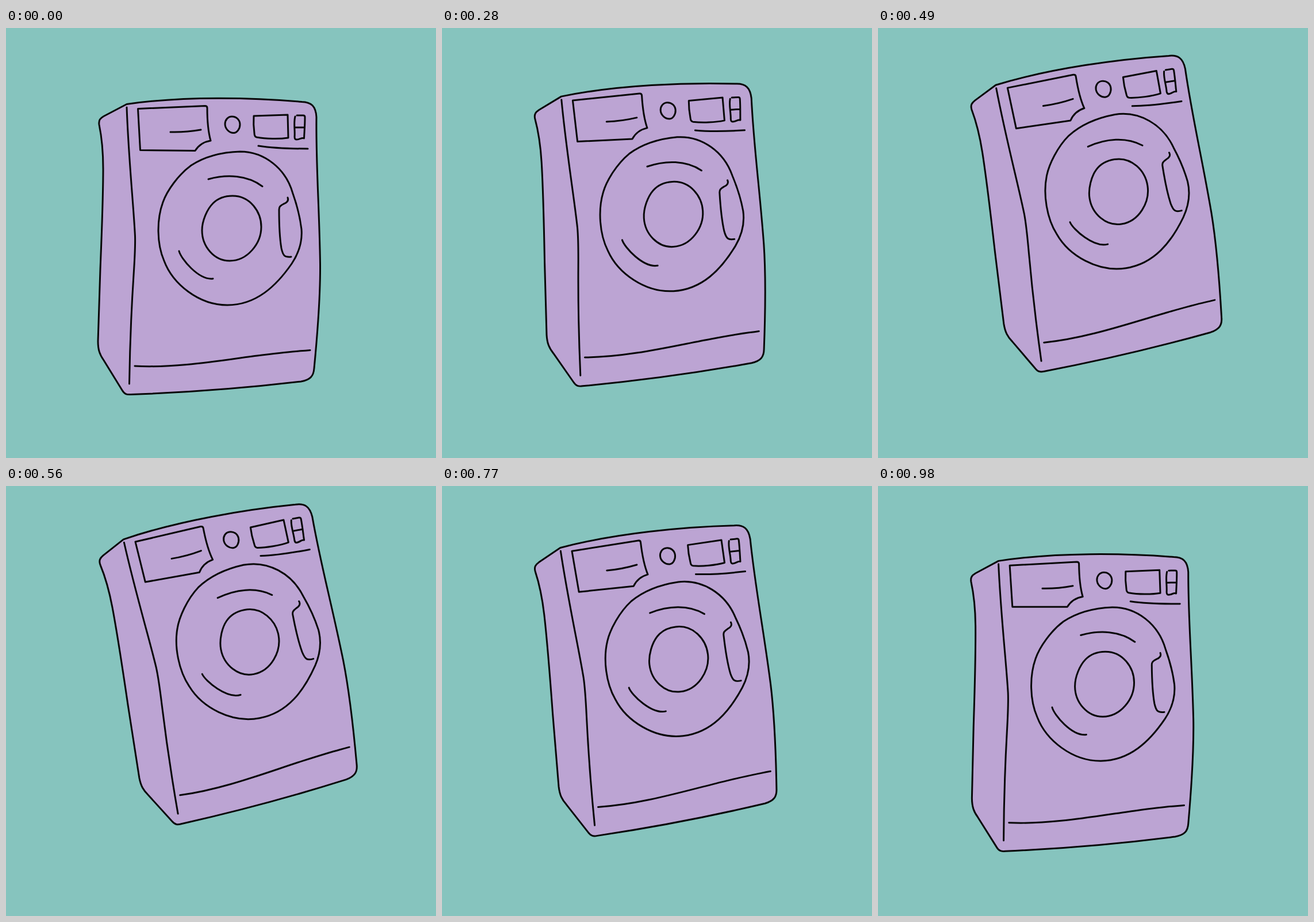
Write an HTML page that moves like this. It is 748 px wide and 748 px high and loops after 1.05 s.

```html
<!DOCTYPE html>
<html lang="en">
<head>
<meta charset="utf-8">
<title>Washing machine</title>
<style>
  html, body { margin: 0; width: 100%; height: 100%; overflow: hidden; background: #86c4be; }
  svg { display: block; width: 100%; height: 100%; }
  #washer { fill: none; stroke: #080808; stroke-width: 3; stroke-linecap: round; stroke-linejoin: round; }
  #washer .body { fill: #bca4d3; }
</style>
</head>
<body>
<svg viewBox="0 0 748 748">
  <g id="washer">
    <!-- cabinet -->
    <path class="body" d="M210 132.500L170 153.500C164 157 161 160 162 168C167 192 169 215 169 245C169 300 166 370 164 420L160 545C160 560 163 568 170 578L202 630C206 637 210 638 217 637.500C320 634 420 626 513 615C529 612 535 606 536 592C542 530 547 470 546.500 410C545 310 539 240 540 155C539 136 531 129 515 128.500C430 121 310 118 210 132.500Z"/>
    <path d="M210 138C213 225 222 310 224.500 362C226 410 217 450 214.500 619"/>
    <path d="M224 588C300 592 380 577 445 569S500 563 529 560.500"/>
    <!-- control panel -->
    <path d="M229.500 140.500L346 135.500Q350 135.500 350 139C350 158 351 178 356 196C343 198 335 204 329 213.500L233.500 212.500Z"/>
    <path d="M286 181C303 181.500 322 180 339 177"/>
    <path d="M393 154C401 154 407 160 407 168C407 175 402 182.500 396 182.500C388 182.500 381 175 381 167C381 160 386 154 393 154Z"/>
    <path d="M431 153L490 151L491 191C475 193.500 452 193 436 190Q432 189 432 183Q430 168 431 153Z"/>
    <path d="M506 152H517Q520 152 520 155C520 170 519 180 518.500 192C514 190 512 194 505 194Q502 194 502 189C503 178 500 165 503 154M503 173H519"/>
    <path d="M439 205C465 209 495 210 525 210"/>
    <!-- door -->
    <path d="M407 215C375 216 345 224 322 239C300 255 280 283 273 303C262 333 262 375 275 405C290 445 335 482 385 482C435 482 470 449 497 410C507 395 516 375 514 350C511 325 505 305 499 288C487 245 450 215 407 215Z"/>
    <path d="M394 292C425 292 444 320 444 346C444 375 420 405 389 405C362 405 341 380 341 352C341 335 350 315 360 305C368 297 380 292 394 292Z"/>
    <path d="M352 263C385 254 420 256 446 275.500"/>
    <path d="M301 388C304 401 335 439 360 436"/>
    <path d="M490 295C492 300 489 304 483 306C477 309 475 311 475 316C475 340 476 365 479 383C482 397 485 399 496 398"/>
  </g>
</svg>
<script>
  const STEP = 70, STEPS = 15, PEAK = 8;
  const RISE = 110 * Math.PI / 180;
  const washer = document.getElementById('washer');

  // Accelerating lift, then a smooth return.
  function lift(k) {
    if (k <= PEAK) return (1 - Math.cos(k / PEAK * RISE)) / (1 - Math.cos(RISE));
    return (1 + Math.cos((k - PEAK) / (STEPS - PEAK) * Math.PI)) / 2;
  }

  function pose(k) {
    const p = lift(k);
    washer.setAttribute('transform',
      `translate(${31.3 * p} ${-77.3 * p}) rotate(${-10.7 * p} 392.5 348.5)`);
  }

  const start = performance.now();
  function tick(now) {
    pose(Math.floor(Math.max(0, now - start) / STEP) % STEPS);
    requestAnimationFrame(tick);
  }
  pose(0);
  requestAnimationFrame(tick);
</script>
</body>
</html>
```
